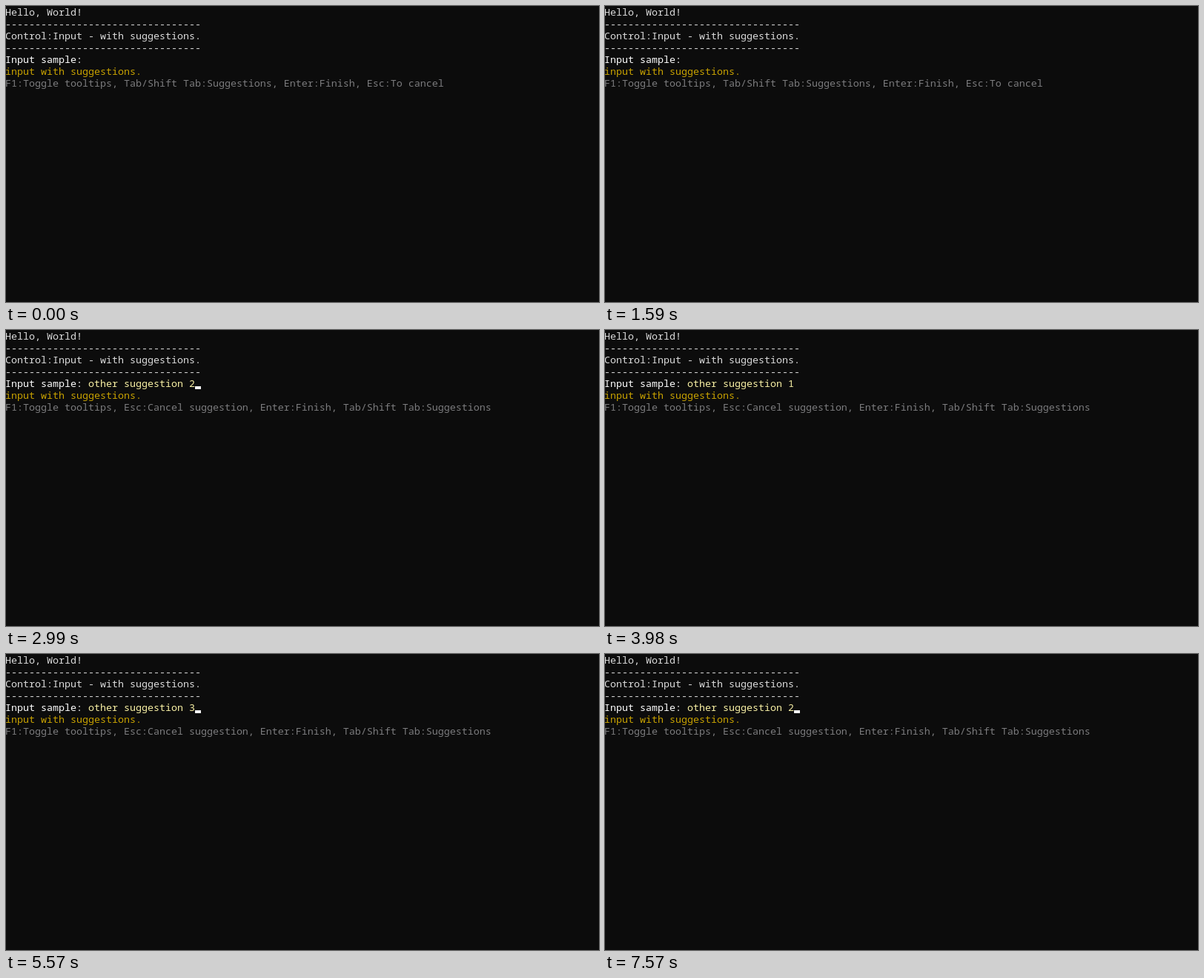
These frames come from a looping animation (800 px wide and 400 px high, 8 s). An HTML page:

```html
<!DOCTYPE html>
<html lang="en">
<head>
<meta charset="utf-8">
<title>Input with suggestions</title>
<style>
  html, body {
    margin: 0;
    width: 100%;
    height: 100%;
    overflow: hidden;
    background: #0c0c0c;
  }
  #screen {
    position: absolute;
    left: -1px;
    top: 0;
    margin: 0;
    font: 13.3333px/16px "Noto Sans Mono", "Liberation Mono", monospace;
    font-variant-ligatures: none;
    color: #dcdcdc;
    white-space: pre;
  }
  #screen div { height: 16px; }
  .prompt { color: #fff; }
  #answer { color: #f9f1a5; }
  .note { color: #c8a200; }
  #hint { color: #7c7c7e; }
  #cursor {
    position: absolute;
    top: 76px;
    width: 8px;
    height: 4px;
    background: #f2f2f2;
  }
</style>
</head>
<body>
<div id="screen"><div>Hello, World!</div><div class="rule"></div><div>Control:Input - with suggestions.</div><div class="rule"></div><div class="prompt">Input sample: <span id="answer"></span></div><div class="note">input with suggestions.</div><div id="hint"></div><i id="cursor"></i></div>
<script>
const LOOP = 8000;
const TICK = 197.8; // the terminal repaints once per tick
const CELL = 8;
const PROMPT_LENGTH = "Input sample: ".length;
const IDLE_HINT = "F1:Toggle tooltips, Tab/Shift Tab:Suggestions, Enter:Finish, Esc:To cancel";
const PICK_HINT = "F1:Toggle tooltips, Esc:Cancel suggestion, Enter:Finish, Tab/Shift Tab:Suggestions";

// Each stage restarts the blink; start and half period are in ticks.
const STAGES = [
  { start: 0.63, half: 1.4, choice: 0 },
  { start: 9.6, half: 1.6, choice: 1 },
  { start: 14.6, half: 1.6, choice: 2 },
  { start: 17.15, half: 2.6, choice: 1, stepBack: 10 }
];

const byId = id => document.getElementById(id);
const answer = byId("answer");
const hint = byId("hint");
const cursor = byId("cursor");
for (const rule of document.querySelectorAll(".rule")) rule.textContent = "-".repeat(33);

// Suggestions 1 to 3 wrap around when stepping backwards.
function choiceAt(stage, age) {
  if (!stage.stepBack) return stage.choice;
  const steps = Math.floor(age / stage.stepBack);
  return (stage.choice + 2 + 2 * steps) % 3 + 1;
}

let shownTick;
function draw(time) {
  const tick = Math.floor(time / TICK);
  if (tick === shownTick) return;
  shownTick = tick;
  const stage = STAGES.findLast(({ start }) => start <= tick) || STAGES[0];
  const age = tick - stage.start;
  const choice = choiceAt(stage, age);
  const lit = Math.floor(age / stage.half) % 2 === 0;
  const text = choice ? `other suggestion ${choice}` : "";
  answer.textContent = text;
  hint.textContent = choice ? PICK_HINT : IDLE_HINT;
  cursor.style.left = (PROMPT_LENGTH + text.length) * CELL + "px";
  cursor.style.visibility = lit ? "visible" : "hidden";
}

const origin = performance.now();
function play() {
  draw((performance.now() - origin) % LOOP);
  requestAnimationFrame(play);
}
play();
</script>
</body>
</html>
```
